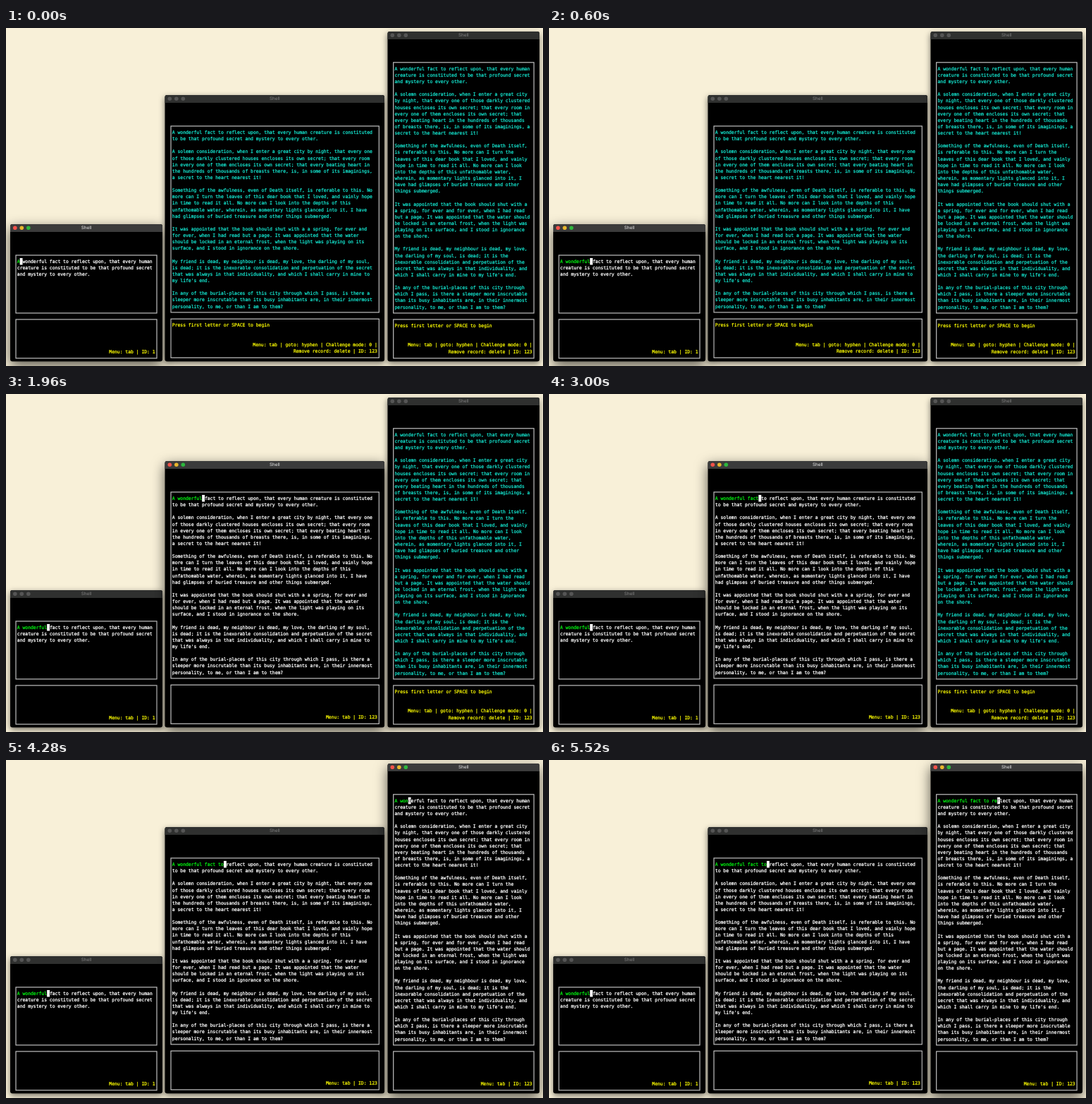
An HTML page for the animation above (5.56 s loop, 762 by 479 pixels).

```html
<!DOCTYPE html>
<html lang="en">
<head>
<meta charset="utf-8">
<title>Shell windows</title>
<style>
  html, body { margin: 0; width: 100%; height: 100%; overflow: hidden; background: #f8f0d8; }
  svg { display: block; width: 762px; height: 479px; }
  text { white-space: pre; text-rendering: geometricPrecision; }
  .mono { font: 6.395px "DejaVu Sans Mono", monospace; stroke-width: .26; }
  .title { font: 500 6.3px Inter, sans-serif; text-anchor: middle; fill: #777; }
  .end { text-anchor: end; }
  .win { filter: drop-shadow(0 3px 4px rgba(0, 0, 0, .55)); }
  .bar { fill: #2f302f; }
  .dot { fill: #555; }
  .box { fill: none; stroke: #c8c8c8; stroke-width: 1.15; }
  .body { fill: #14e2cc; stroke: #14e2cc; }
  .foot { fill: #f8f800; stroke: #f8f800; }
  .started .body { fill: #fff; stroke: #fff; }
  .started .done { fill: #00f010; stroke: #00f010; }
  .started .under { fill: #555; stroke: none; }
  .cursor { fill: #fff; }
  .focus { filter: drop-shadow(0 6px 9px rgba(0, 0, 0, .65)); }
  .focus .bar { fill: #3b3b3b; }
  .focus .title { fill: #d4d4d4; }
  .focus .red { fill: #f4524a; }
  .focus .amber { fill: #e8b62c; }
  .focus .green { fill: #2db83d; }
  .started .intro, .win:not(.started) .live { display: none; }
</style>
</head>
<body>
<svg id="stage" viewBox="0 0 762 479"></svg>
<script>
const LOOP = 5560, CELL = 3.85, ROW = 9.13, BOTTOM = 472.6;
const stage = document.getElementById('stage');

const wide = `A wonderful fact to reflect upon, that every human creature is constituted
to be that profound secret and mystery to every other.

A solemn consideration, when I enter a great city by night, that every one
of those darkly clustered houses encloses its own secret; that every room
in every one of them encloses its own secret; that every beating heart in
the hundreds of thousands of breasts there, is, in some of its imaginings,
a secret to the heart nearest it!

Something of the awfulness, even of Death itself, is referable to this. No
more can I turn the leaves of this dear book that I loved, and vainly hope
in time to read it all. No more can I look into the depths of this
unfathomable water, wherein, as momentary lights glanced into it, I have
had glimpses of buried treasure and other things submerged.

It was appointed that the book should shut with a a spring, for ever and
for ever, when I had read but a page. It was appointed that the water
should be locked in an eternal frost, when the light was playing on its
surface, and I stood in ignorance on the shore.

My friend is dead, my neighbour is dead, my love, the darling of my soul,
is dead; it is the inexorable consolidation and perpetuation of the secret
that was always in that individuality, and which I shall carry in mine to
my life's end.

In any of the burial-places of this city through which I pass, is there a
sleeper more inscrutable than its busy inhabitants are, in their innermost
personality, to me, or than I am to them?`;

// Greedy word wrap for the narrow terminals.
function wrap(text, cols) {
  return text.split('\n\n').flatMap((para, i) => {
    const lines = i ? ['', ''] : [''];
    for (const word of para.split(/\s+/)) {
      const last = lines[lines.length - 1];
      const next = last ? last + ' ' + word : word;
      if (next.length > cols) lines.push(word);
      else lines[lines.length - 1] = next;
    }
    return lines;
  });
}

function add(parent, tag, attrs, content = '') {
  const el = document.createElementNS('http://www.w3.org/2000/svg', tag);
  for (const key in attrs) el.setAttribute(key, attrs[key]);
  el.textContent = content;
  return parent.appendChild(el);
}

// keys: [time, letters typed]; the first one also starts the session.
const specs = [
  { x: 6, y: 278, w: 216, box: [14, 322, 200, 82], foot: 413, id: 1,
    lines: wrap(wide.split('\n\n')[0], 50), keys: [[0, 1], [560, 11]], focusAt: 0 },
  { x: 225.5, y: 95, w: 311.5, box: [234, 139, 295.3, 264], foot: 412.3, id: 123,
    lines: wide.split('\n'), keys: [[1400, 1], [1930, 11], [2980, 16], [3240, 19]], focusAt: 880 },
  { x: 541.5, y: 5, w: 215.5, box: [549.7, 48.8, 199.4, 355.2], foot: 413, id: 123,
    lines: wrap(wide, 50), keys: [[3940, 1], [4260, 5], [5240, 19], [5360, 19], [5510, 22]], focusAt: 3320 }
];

function buildWindow({ x, y, w, box, foot, id, lines }) {
  const g = add(stage, 'g', { class: 'win' });
  add(g, 'rect', { x, y, width: w, height: BOTTOM - y, rx: 3 });
  add(g, 'path', { class: 'bar', d: `M${x} ${y + 11}v-8q0-3 3-3h${w - 6}q3 0 3 3v8z` });
  ['red', 'amber', 'green'].forEach((name, i) =>
    add(g, 'circle', { class: 'dot ' + name, cx: x + 6.8 + i * 9.5, cy: y + 5.2, r: 2.8 }));
  add(g, 'text', { class: 'title', x: x + w / 2, y: y + 7.4 }, 'Shell');

  const [bx, by, bw, bh] = box;
  add(g, 'rect', { class: 'box', x: bx, y: by, width: bw, height: bh });
  add(g, 'rect', { class: 'box', x: bx, y: foot, width: bw, height: 55 });

  const left = bx + 1.8, right = bx + bw - 2.4, base = by + 11;
  const cursor = add(g, 'rect', { class: 'cursor live', y: base - 7, width: CELL, height: 9.6 });
  lines.forEach((line, i) => {
    if (i) add(g, 'text', { class: 'mono body', x: left, y: base + i * ROW }, line);
  });
  const first = add(g, 'text', { class: 'mono body', x: left, y: base });
  const parts = ['done', 'under', 'rest'].map(name => add(first, 'tspan', { class: name }));

  const note = (row, text, kind, end) => add(g, 'text',
    { class: `mono foot ${kind} ${end ? 'end' : ''}`, x: end ? right : left, y: foot + 11.1 + row * ROW }, text);
  note(0, 'Press first letter or SPACE to begin', 'intro');
  note(3, 'Menu: tab | goto: hyphen | Challenge mode: 0 |', 'intro', true);
  note(4, 'Remove record: delete | ID: 123', 'intro', true);
  note(4, 'Menu: tab | ID: ' + id, 'live', true);
  return { g, cursor, parts, left, shown: -1 };
}

function typedAt(keys, t) {
  if (t < keys[0][0]) return 0;
  for (let i = 1; i < keys.length; i++) {
    const [t0, n0] = keys[i - 1], [t1, n1] = keys[i];
    if (t < t1) return Math.floor(n0 + (n1 - n0) * (t - t0) / (t1 - t0));
  }
  return keys[keys.length - 1][1];
}

const wins = specs.map(buildWindow);
let focused = -1;

function setTyped(win, line, n) {
  if (win.shown === n) return;
  win.shown = n;
  win.g.classList.toggle('started', n > 0);
  win.cursor.setAttribute('x', win.left + n * CELL);
  const cut = n ? n + 1 : 0;
  [line.slice(0, n), line.slice(n, cut), line.slice(cut)]
    .forEach((s, i) => { win.parts[i].textContent = s; });
}

function draw(t) {
  specs.forEach((spec, i) => setTyped(wins[i], spec.lines[0], typedAt(spec.keys, t)));
  const top = specs.filter(spec => t >= spec.focusAt).length - 1;
  if (top === focused) return;
  focused = top;
  wins.forEach((win, i) => win.g.classList.toggle('focus', i === top));
  wins.forEach((win, i) => { if (i !== top) stage.append(win.g); });
  stage.append(wins[top].g);
}

const start = performance.now();
function tick() {
  draw((performance.now() - start) % LOOP);
  requestAnimationFrame(tick);
}
tick();
</script>
</body>
</html>
```
